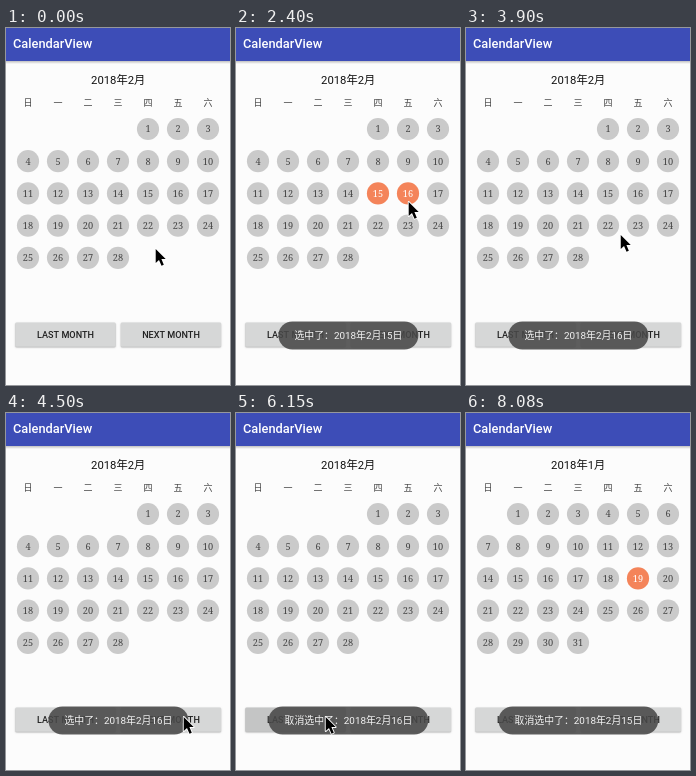
Recreate the animation shown at these times as an HTML page with a canvas. Size 224 by 357 pixels, loop 8.53 s.

```html
<!DOCTYPE html>
<html lang="zh-CN">
<head>
<meta charset="utf-8">
<title>CalendarView</title>
<style>
html, body { margin: 0; width: 100%; height: 100%; overflow: hidden; background: #fcfcfc; }
canvas { display: block; width: 224px; height: 357px; }
</style>
</head>
<body>
<canvas id="stage"></canvas>
<script>
const W = 224, H = 357, LOOP = 8530, STEP = 150;
const SANS = "Roboto, 'Noto Sans CJK SC', 'Noto Sans CJK', sans-serif";
const SERIF = "'Noto Serif', serif";
const canvas = document.getElementById('stage');
const ctx = canvas.getContext('2d');
const scale = window.devicePixelRatio || 1;
canvas.width = W * scale;
canvas.height = H * scale;

// Where the pointer rests or turns: time, x, y.
const stops = [
  [900, 149, 220], [1500, 141, 170.5], [1650, 141, 170.5], [2100, 172, 173],
  [2400, 172, 173], [2850, 168, 186], [3300, 157.3, 172], [3600, 146, 172],
  [4500, 177, 303], [4650, 177, 303], [4950, 195, 303], [5100, 195, 303],
  [5400, 89, 303], [6750, 89, 303], [7340, -20, 312]
];

// Taps either toggle a day or move by a month.
const taps = [
  { time: 1650, day: 15 }, { time: 2400, day: 16 },
  { time: 3150, day: 16 }, { time: 3750, day: 15 },
  { time: 4950, go: 1 }, { time: 5850, go: -1 },
  { time: 6300, go: -1, day: 19 }
];

// Toasts queue up and each stays for the same time.
const toasts = [15, 16, 16, 15].map((day, i) =>
  `${i < 2 ? '' : '取消'}选中了：2018年2月${day}日`);
const TOAST_START = 1800, TOAST_TIME = 1950;

function cursorAt(t) {
  const next = stops.findIndex(s => s[0] > t);
  if (next === 0) return stops[0].slice(1);
  if (next < 0) return stops[stops.length - 1].slice(1);
  const [t0, x0, y0] = stops[next - 1];
  const [t1, x1, y1] = stops[next];
  const k = (t - t0) / (t1 - t0);
  const ease = k * k * (3 - 2 * k);
  return [x0 + (x1 - x0) * ease, y0 + (y1 - y0) * ease];
}

function stateAt(t) {
  const state = { month: 2, picked: new Set(), pressed: 0 };
  for (const { time, day, go = 0 } of taps) {
    if (go && t >= time - STEP && t < time) state.pressed = go;
    if (t < time) continue;
    state.month += go;
    if (day && !state.picked.delete(day)) state.picked.add(day);
  }
  return state;
}

function text(str, x, y, font, color, align = 'center') {
  ctx.font = font;
  ctx.fillStyle = color;
  ctx.textAlign = align;
  ctx.fillText(str, x, y);
}

function box(x, y, w, h, r, color) {
  ctx.fillStyle = color;
  ctx.beginPath();
  ctx.roundRect(x, y, w, h, r);
  ctx.fill();
}

function drawHeader() {
  const shade = ctx.createLinearGradient(0, 33, 0, 36);
  shade.addColorStop(0, 'rgba(0,0,0,.24)');
  shade.addColorStop(1, 'rgba(0,0,0,0)');
  ctx.fillStyle = shade;
  ctx.fillRect(0, 33, W, 3);
  ctx.fillStyle = '#3d4db7';
  ctx.fillRect(0, 0, W, 33);
  text('CalendarView', 7, 20, `500 12.8px ${SANS}`, '#fff', 'left');
}

function drawMonth(month, picked) {
  text(`2018年${month}月`, 112.2, 56, `11.3px ${SANS}`, '#111');
  [...'日一二三四五六'].forEach((d, i) =>
    text(d, 22 + 30 * i, 78, `9px ${SANS}`, '#444'));

  const first = new Date(2018, month - 1, 1).getDay();
  const count = new Date(2018, month, 0).getDate();
  for (let day = 1; day <= count; day++) {
    const cell = first + day - 1;
    const x = 22 + 30 * (cell % 7);
    const y = 101 + 32.2 * Math.floor(cell / 7);
    const on = picked.has(day);
    ctx.fillStyle = on ? '#f4845a' : '#cacaca';
    ctx.beginPath();
    ctx.arc(x, y, 11.1, 0, 2 * Math.PI);
    ctx.fill();
    text(day, x, y + 3.3, `9.2px ${SERIF}`, on ? '#fff' : '#444');
  }
}

function drawButton(label, x, pressed) {
  ctx.save();
  ctx.shadowColor = 'rgba(0,0,0,.3)';
  ctx.shadowBlur = 1.5 * scale;
  ctx.shadowOffsetY = 0.8 * scale;
  box(x, 294.5, 100.3, 24.3, 1.3, pressed ? '#c4c5c5' : '#d6d7d7');
  ctx.restore();
  text(label, x + 50.2, 310, `500 9.1px ${SANS}`, '#212121');
}

function drawToast(t) {
  if (t < TOAST_START) return;
  const str = toasts[Math.floor((t - TOAST_START) / TOAST_TIME)];
  ctx.save();
  ctx.globalAlpha = Math.min(1, (t - TOAST_START + STEP) / (3 * STEP));
  ctx.font = `9.9px ${SANS}`;
  const w = ctx.measureText(str).width + 32;
  box(112.4 - w / 2, 293.5, w, 28, 14, 'rgba(72,72,72,.88)');
  text(str, 112.4, 311, ctx.font, '#f4f4f4');
  ctx.restore();
}

function drawCursor(x, y) {
  const shape = [[0, 0], [0, 14], [3.3, 11], [5.8, 16.7], [8.1, 15.7], [5.7, 10.1], [10, 10.1]];
  ctx.save();
  ctx.translate(x + 0.7, y + 1);
  ctx.beginPath();
  shape.forEach(p => ctx.lineTo(...p));
  ctx.closePath();
  ctx.lineJoin = 'round';
  ctx.lineWidth = 1.8;
  ctx.strokeStyle = '#fff';
  ctx.stroke();
  ctx.fillStyle = '#000';
  ctx.fill();
  ctx.restore();
}

function draw(time) {
  const t = Math.floor(time / STEP) * STEP;
  const { month, picked, pressed } = stateAt(t);
  ctx.setTransform(scale, 0, 0, scale, 0, 0);
  ctx.fillStyle = '#fcfcfc';
  ctx.fillRect(0, 0, W, H);
  drawHeader();
  drawMonth(month, picked);
  drawButton('LAST MONTH', 9.3, pressed < 0);
  drawButton('NEXT MONTH', 114.8, pressed > 0);
  drawToast(t);
  drawCursor(...cursorAt(t));
}

const start = performance.now();
function tick() {
  draw((performance.now() - start) % LOOP);
  requestAnimationFrame(tick);
}
tick();
</script>
</body>
</html>
```
